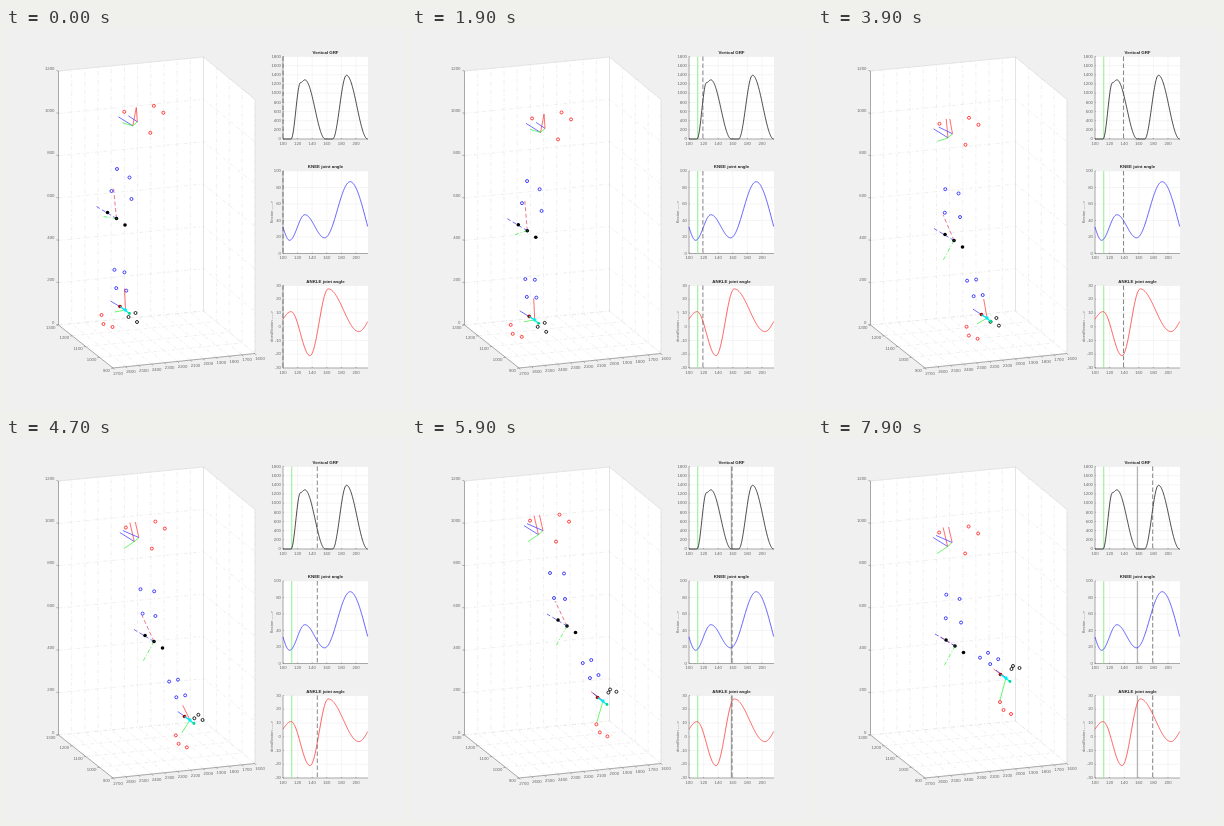
Recreate the animation shown at these times as an HTML page with a canvas. Size 400 px wide and 382 px high, loop 8 s.

```html
<!DOCTYPE html>
<html lang="en">
<head>
<meta charset="utf-8">
<title>Gait analysis</title>
<style>
html, body { margin: 0; height: 100%; overflow: hidden; background: #f0f0f0; }
canvas { display: block; width: 400px; height: 382px; }
</style>
</head>
<body>
<canvas id="stage"></canvas>
<script>
const LOOP = 8000, STEP = 100, HEEL_STRIKE = 112, TOE_OFF = 158;
const RED = '#ff2020', BLUE = '#2020ff', GREEN = '#20f020', BLACK = '#000', CYAN = '#00f0f0';
const scale = Math.max(1, window.devicePixelRatio || 1);
const canvas = document.getElementById('stage');
canvas.width = 400 * scale;
canvas.height = 382 * scale;
const ctx = canvas.getContext('2d');
ctx.scale(scale, scale);

const add = (a, b) => [a[0] + b[0], a[1] + b[1]];
const mix = (a, b, u) => [a[0] + (b[0] - a[0]) * u, a[1] + (b[1] - a[1]) * u];
const wave = (t, from, period) => 0.5 - 0.5 * Math.cos(2 * Math.PI * (t - from) / period);
const ramp = (t, from, to) => wave(Math.min(Math.max(t, from), to), from, 2 * (to - from));

// The knee and ankle travel along smooth curves through these places.
const times = [0, 1000, 2700, 3900, 4700, 5900, 7900];
const kneePath = [[110.5, 190.5], [113, 194], [120, 210], [136, 212.5], [148, 203.5], [155, 188], [137, 208]];
const anklePath = [[119.5, 282], [107.5, 286], [144, 295], [169, 290], [184, 282], [191, 263], [188, 240]];

// Cubic curve through ys at xs, with parabolic ends.
function spline(xs, ys, x) {
  const last = xs.length - 1;
  const chord = i => (ys[i + 1] - ys[i]) / (xs[i + 1] - xs[i]);
  const slope = i => {
    if (i === 0) return 2 * chord(0) - slope(1);
    if (i === last) return 2 * chord(last - 1) - slope(last - 1);
    const a = xs[i] - xs[i - 1], b = xs[i + 1] - xs[i];
    return (chord(i - 1) * b + chord(i) * a) / (a + b);
  };
  let i = 0;
  while (i < last - 1 && x > xs[i + 1]) i++;
  const h = xs[i + 1] - xs[i], u = (x - xs[i]) / h, v = 1 - u;
  return ys[i] * v * v * (1 + 2 * u) + ys[i + 1] * u * u * (3 - 2 * u) +
    h * u * v * (slope(i) * v - slope(i + 1) * u);
}
const along = (path, t) => [0, 1].map(axis => spline(times, path.map(p => p[axis]), t));

function line(points, color, width = 0.65, dash = []) {
  ctx.beginPath();
  points.forEach(p => ctx.lineTo(...p));
  ctx.strokeStyle = color;
  ctx.lineWidth = width;
  ctx.setLineDash(dash);
  ctx.stroke();
}

function ring(p, color) {
  ctx.beginPath();
  ctx.arc(...p, 1.5, 0, 7);
  ctx.setLineDash([]);
  ctx.strokeStyle = color;
  ctx.lineWidth = 0.85;
  ctx.stroke();
}

function dot(p, color, radius) {
  ctx.beginPath();
  ctx.arc(...p, radius, 0, 7);
  ctx.fillStyle = color;
  ctx.fill();
}

function label(text, x, y, align = 'center', font = '4.3px', color = '#666') {
  ctx.font = font + ' Arial, "Liberation Sans", sans-serif';
  ctx.textAlign = align;
  ctx.textBaseline = 'middle';
  ctx.fillStyle = color;
  ctx.fillText(text, x, y);
}

function drawRoom() {
  const left = [52.5, 297], back = [197.5, 283], right = [249, 325.5], front = [107, 340];
  const up = (p, u = 1) => [p[0], p[1] - 254 * u];
  ctx.beginPath();
  [up(left), up(back), up(right), right, front, left].forEach(p => ctx.lineTo(...p));
  ctx.fillStyle = '#fff';
  ctx.fill();
  const grid = (...points) => line(points, '#e4e4e4', 0.6, [4, 2, 1, 2]);
  for (let i = 0; i < 12; i++) {
    const u = i / 11, far = mix(left, back, u), near = mix(front, right, u);
    grid(near, far, up(far));
    line([near, add(near, [1.2, 1.5])], '#777', 0.6);
    label(2700 - 100 * i, near[0] + 5, near[1] + 5.5);
  }
  for (let i = 0; i < 5; i++) {
    const u = i / 4, a = mix(left, front, u), b = mix(back, right, u);
    grid(a, b, up(b));
    line([a, add(a, [-2, 0.3])], '#777', 0.6);
    label(1300 - 100 * i, a[0] - 3, a[1] + 2.5, 'right');
  }
  for (let i = 0; i < 7; i++) {
    const u = i / 6, a = up(left, u);
    grid(a, up(back, u), up(right, u));
    line([a, add(a, [-2, -0.5])], '#777', 0.6);
    label(200 * i, a[0] - 4, a[1] - 2.5, 'right');
  }
  line([up(left), up(back), up(right), right], '#dcdcdc', 0.6);
  line([up(back), back], '#dcdcdc', 0.6);
  line([up(left), left, front, right], '#777', 0.6);
}

// Each curve eases between its turning points, given as [sample, value].
const charts = [
  { top: 28.5, title: 'Vertical GRF', ticks: 9, low: 0, step: 200, color: BLACK,
    turns: [[95, 0], [111, 0], [124, 1230], [130, 1290], [158, 0], [168, 0], [187, 1390], [216, 0]] },
  { top: 143, title: 'KNEE joint angle', ticks: 5, low: 0, step: 20, color: BLUE, side: 'flexion ---->',
    turns: [[90, 51], [109, 16], [130, 47], [157, 19], [192, 87], [236, -8]] },
  { top: 257.5, title: 'ANKLE joint angle', ticks: 6, low: -30, step: 10, color: RED, side: 'dorsiflexion ---->',
    turns: [[89, 0], [111, 11], [137, -21], [162, 27.5], [204, -3.5], [228, 11]] }
];
const sampleX = n => 277 + (n - 100) * 0.73;

function curveValue(turns, n) {
  const i = turns.findIndex(turn => turn[0] >= n);
  const [from, a] = turns[i - 1], [to, b] = turns[i];
  return a + (b - a) * ramp(n, from, to);
}

function drawChart({ top, title, ticks, low, step, color, turns, side }, now) {
  const height = 82.5, bottom = top + height;
  const valueY = v => bottom - height * (v - low) / (ticks * step);
  const upright = (n, shade, width, dash) =>
    line([[sampleX(n), top], [sampleX(n), bottom]], shade, width, dash);
  ctx.fillStyle = '#fff';
  ctx.fillRect(277, top, 85, height);
  for (let i = 0; i <= ticks; i++) {
    const value = low + step * i, y = valueY(value);
    line([[277, y], [362, y]], '#eee', 0.6);
    line([[277, y], [278, y]], '#777', 0.6);
    label(value, 275, y, 'right');
  }
  for (let n = 100; n <= 200; n += 20) {
    const x = sampleX(n);
    upright(n, '#eee', 0.6);
    line([[x, bottom], [x, bottom - 1]], '#777', 0.6);
    label(n, x, bottom + 4.5);
  }
  line([[277, top], [277, bottom], [362, bottom]], '#777', 0.6);
  label(title, 319.5, top - 3.8, 'center', 'bold 4.4px', '#222');
  if (side) {
    ctx.save();
    ctx.translate(265.5, top + 41);
    ctx.rotate(-Math.PI / 2);
    label(side, 0, 0);
    ctx.restore();
  }
  if (now >= HEEL_STRIKE) upright(HEEL_STRIKE, '#80ee80', 0.9);
  if (now >= TOE_OFF) upright(TOE_OFF, '#999', 0.9);
  const curve = [];
  for (let n = 100; n <= 216; n += 0.5) curve.push([sampleX(n), valueY(curveValue(turns, n))]);
  line(curve, color, 0.7);
  upright(now, '#555', 0.7, [4.5, 2.5]);
}

function drawPelvis(t) {
  const bob = wave(t, 500, 5500), turn = ramp(t, 2700, 4700);
  const pelvis = [118 + 4 * bob, 82.6 + 15.2 * bob];
  const at = (a, b = a) => add(pelvis, mix(a, b, turn));
  const outer = at([8.5, 14]), inner = at([13, 10]);
  line([outer, at([-6, 5])], BLUE);
  line([outer, at([12, -4.5], [4, -5])], RED);
  line([at([-2, 11], [-2, 21]), outer, inner], GREEN);
  line([inner, at([4, 4], [-3, 3])], BLUE);
  line([inner, at([12, -4], [9.5, -5.5])], RED);
  [[0, 0], [29.5, -6], [39, 1], [26, 21]].forEach(p => ring(at(p), RED));
}

function drawThigh(t, knee, ankle) {
  const swing = wave(t, 200, 11400) ** 2;
  const at = (a, b = a, u = swing) => add(knee, mix(a, b, u));
  line([knee, mix(knee, ankle, -1 / 3)], '#e03050', 0.65, [4, 2.5]);
  line([knee, at([-20, -12])], BLUE, 0.65, [4, 2.5]);
  line([knee, at([-13.5, -2], [-11, 20], ramp(t, 800, 3900))], GREEN, 0.65, [4, 2, 1, 2]);
  ring(at([0.5, -49.5], [-17, -53]), BLUE);
  ring(at([13, -41], [-3, -52.5]), BLUE);
  ring(at([-5, -27.5], [-13, -28]), BLUE);
  ring(at([15, -19.5], [-2, -27]), BLUE);
  [[-9, -6], [0, 0], [8.5, 6.5]].forEach(p => dot(at(p), BLACK, 1.8));
  dot(knee, '#064', 0.7);
}

function drawShank(t, knee, ankle) {
  const u = t / LOOP;
  for (const height of [0.45, 0.25]) {
    const middle = mix(ankle, knee, height);
    ring(add(middle, mix([-7, 1], [-3, -6], u)), BLUE);
    ring(add(middle, mix([3, 3.5], [5, -11], u)), BLUE);
  }
}

function drawFoot(t, ankle) {
  const pitch = ramp(t, 2900, 6300);
  const at = (a, b = a) => add(ankle, mix(a, b, pitch));
  line([ankle, at([-1, -21.5], [-12.5, -9])], RED);
  line([ankle, at([-15, -9], [-10, -8])], BLUE);
  line([ankle, at([-11, 2], [-6, 22])], GREEN);
  ring(at([10, 3], [7, -12]), BLACK);
  ring(at([3, 7], [5.5, -9]), BLACK);
  ring(at([11.5, 12], [13.5, -10]), BLACK);
  ring(at([-24, 5], [-6, 24]), RED);
  ring(at([-22, 14], [-2.5, 32]), RED);
  ring(at([-13, 17], [5, 36]), RED);
  const near = at([-5.5, -3.5]), far = at([4, 3.5]);
  dot(near, '#a00', 1.8);
  line([near, far], CYAN, 1.3);
  dot(ankle, CYAN, 1.7);
  dot(far, '#00d890', 1.4);
}

function draw(clock) {
  const t = Math.floor(clock % LOOP / STEP) * STEP;
  const knee = along(kneePath, t), ankle = along(anklePath, t);
  ctx.fillStyle = '#f0f0f0';
  ctx.fillRect(0, 0, 400, 382);
  drawRoom();
  charts.forEach(chart => drawChart(chart, 100 + t / 100));
  drawPelvis(t);
  drawThigh(t, knee, ankle);
  drawShank(t, knee, ankle);
  drawFoot(t, ankle);
}

const start = performance.now();
function frame() {
  draw(performance.now() - start);
  requestAnimationFrame(frame);
}
frame();
</script>
</body>
</html>
```
